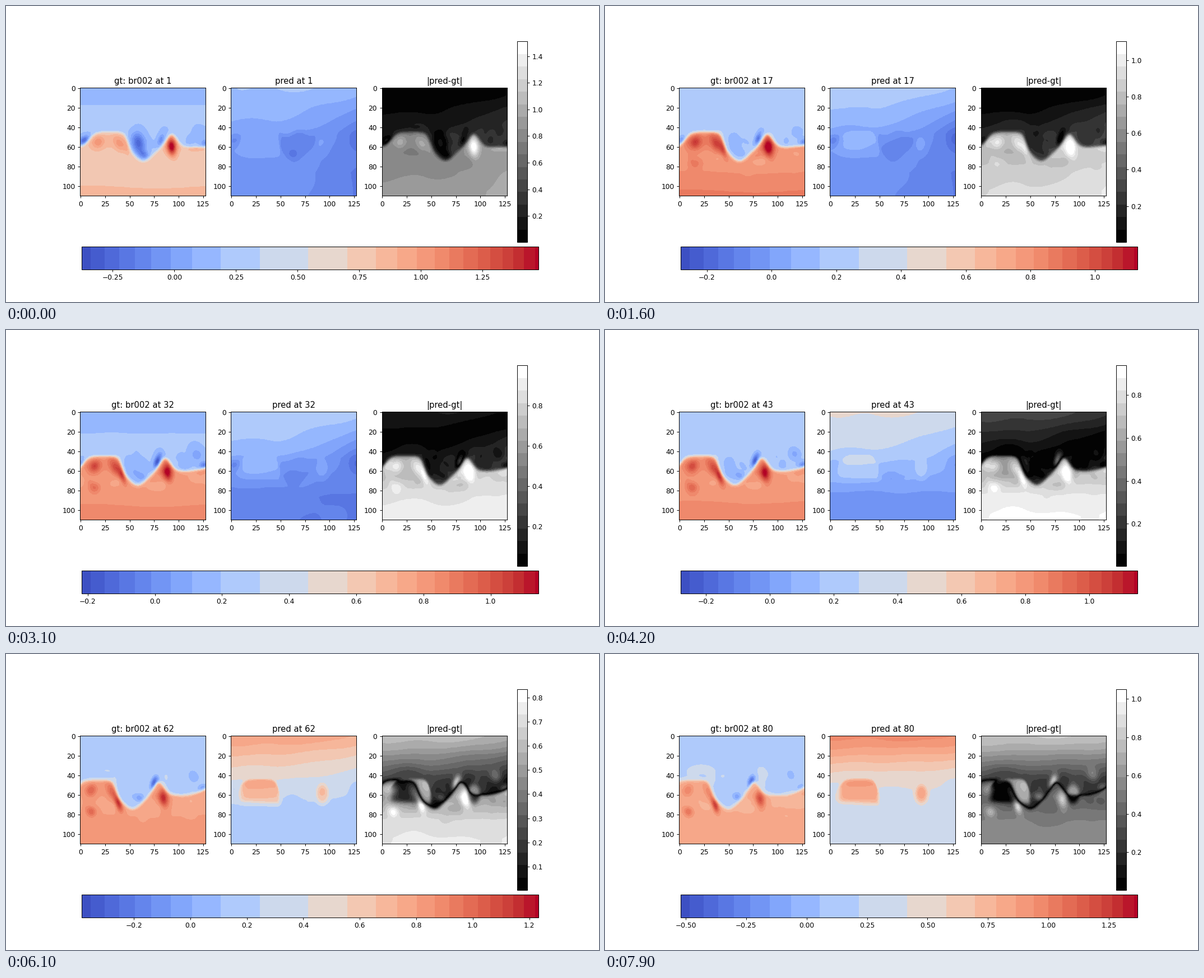
Animation of 1058x529 px, one loop 8 s. Source, as a matplotlib script:

```python
import numpy as np
import matplotlib.pyplot as plt
from matplotlib.animation import FuncAnimation
from matplotlib.colors import ListedColormap

W, H, FRAMES = 1058, 529, 80
NX, NY = 128, 110
xs, ys = np.arange(NX), np.arange(NY)
X, Y = np.meshgrid(xs.astype(float), ys.astype(float))

rng = np.random.default_rng(7)
EDDIES = [(rng.uniform(0, 138), rng.normal(58, 12), rng.uniform(2, 5), rng.uniform(2, 4.5),
           rng.uniform(-.8, .8), rng.uniform(-.06, .06)) for _ in range(45)]


def step(v):
    return .5 * (1 + np.tanh(v))


def ramp(t, middle, width):
    return step((t - middle) / width / 2)


def bell(v):
    return np.exp(-.5 * v ** 2)


def blob(x, y, sx, sy, tilt=0):
    c, s = np.cos(tilt), np.sin(tilt)
    u = (X - x) * c + (Y - y) * s
    v = (Y - y) * c - (X - x) * s
    return bell(np.hypot(u / sx, v / sy))


def wave(t):
    """Hump edge, trough and crest, all drifting left."""
    return 48.5 - .2 * t, 64 - .18 * t, 93 - .215 * t


def interface(t):
    edge, trough, crest = wave(t)
    hump = step((xs - 9 + .2 * t) / 6) - step((xs - edge) / 3.5)
    y = 60 - 15.5 * hump + 14 * bell((xs - trough) / 9) - 13 * bell((xs - crest) / 5.5)
    return y - .1 * t * np.clip((xs - 105) / 22, 0, 1) ** 2


def hot_spots(t):
    edge, trough, crest = wave(t)
    start = np.exp(-t / 8)
    return ((.29 + .0015 * t + .42 * start) * blob(crest + .08 * t, 60 + .06 * t, 3.7, 7, -.1)
            + (.12 + .005 * t) * blob(edge - 1 + .06 * t, 62 + .1 * t, 2.5, 6, -.3)
            + .18 * blob(edge - 9 + .08 * t, 57, 3.5, 6, -.4)
            + .2 * blob(18 - .12 * t, 55, 4, 5, .3)
            + .0027 * t * blob(17 - .1 * t, 77, 3.5, 4, -.4)
            + .2 * start * blob(118, 61.5, 6, 1.8)
            - .06 * blob(trough + 21, 76 - .06 * t, 7, 4))


def cold_spots(t):
    edge, trough, crest = wave(t)
    start = np.exp(-t / 6)
    return (-(.13 + .36 * start) * blob(trough - 5, 56, 5, 8, -.2)
            - (.004 * t + .25 * start) * blob(trough + 1 + .1 * t, 68 - .08 * t, 4, 3, .5)
            - (.27 + .004 * t) * blob(crest - 11 + .1 * t, 53 - .08 * t, 2.5, 5, .3)
            - (.2 + .25 * start) * blob(4 - .12 * t, 53, 4.5, 3, -.5)
            - .27 * blob(128 - .05 * t, 56 - .05 * t, 4, 3, -.4)
            - (.08 + .0015 * t) * blob(121 - .1 * t, 46 - .09 * t, 4, 5, -.3)
            + .05 * blob(38 - .2 * t, 36, 10, 5)
            + .05 * blob(crest + 7, 46 - .06 * t, 5, 7))


def truth(t):
    yi = interface(t)
    low = step((Y - yi) / np.hypot(1, np.gradient(yi)) / 1.7)
    upper = .18 + .015 * step((Y - 17) / 2) + .0003 * np.clip(Y - 17, 0, 30)
    lower = .77 + .088 * np.clip((Y + 1.5 * np.sin(X / 21 + 1) - 62) / 43, 0, 1) ** 1.2
    lower += (.11 - .001 * t) * bell((Y - 54) / 7) - .03 * np.exp(-t / 6)
    k = t / FRAMES
    noise = sum(a * blob(x - 11 * k, y, sx, sy, r + .5 * k) for x, y, sx, sy, r, a in EDDIES)
    field = (upper + cold_spots(t)) * (1 - low) + (lower + hot_spots(t)) * low
    return field + noise * min(1, .5 + t / 40)


# Shapes the prediction keeps from the first interface
Y0 = interface(0)
HUMP = (step((Y - Y0 + 1) / 1.5) * step((66 + .06 * X - Y) / 2.5)
        * step((X - 9) / 3) * step((49 - X) / 1.5))
BULB = np.exp(-np.hypot((X - 93) / 6.5, (Y - 59) / 10) ** 4)
BOWL = (step((Y0 + 1 - Y) / 2) * step((Y - 46 - 2 * np.sin(X / 4)) / 2)
        * step((X - 49) / 1.5) * step((86 - X) / 2.5))
SIDES = .12 * blob(3, 53, 5, 4, -.4) + .055 * blob(127, 53, 5, 6)
POCKET = blob(62, 66, 4.5, 4.5, -.5)
TOP = blob(70, 0, 28, 8)
SLOPE = np.clip((X - 45) / 82, 0, 1) ** 1.4
WOBBLE = .006 * (np.sin(X / 9 + Y / 13) + np.sin(X / 17 - Y / 8 + 2))


def forecast(t):
    # The top warms first, then the middle, then the floor
    top = .17 + .84 * ramp(t, 51, 11)
    mid = .02 + .46 * ramp(t, 42, 9)
    floor = -.05 + .37 * ramp(t, 62, 7)
    depth = np.clip(Y + 1.5 * np.sin(X / 23) + .02 * X, 0, None)
    field = top + (mid - top) * np.clip(depth / 45, 0, 1) ** 1.4
    field += (floor - mid) * np.clip((depth - 45) / 42, 0, 1)
    tail = .7 * max(0, 1 - t / 40)
    weight = np.interp(Y, [0, 20, 47, 80], [.4, .8, 1, tail])
    field -= .17 * (1 - (t / 85) ** 4) * SLOPE * weight
    field += (.05 + .38 * ramp(t, 52, 5)) * (HUMP + BULB) + .035 * TOP
    field -= .1 * np.exp(-t / 30) * BOWL + SIDES
    field -= (.03 + .07 * bell((t - 55) / 9)) * POCKET
    return field + WOBBLE


def limits(t):
    lo = np.interp(t, [0, 16, 29, 61, 79], [-.376, -.2816, -.207, -.385, -.521])
    hi = np.interp(t, [0, 16, 51, 79], [1.476, 1.131, 1.157, 1.368])
    err = np.interp(t, [0, 16, 31, 62, 79], [1.511, 1.103, .999, .828, 1.048])
    return (lo, hi), (lo, hi), (.002, err)


def banded(name, edges, tones):
    pos = (np.arange(256) + .5) / 256
    return ListedColormap(plt.get_cmap(name)(tones)[np.searchsorted(edges, pos)])


# Colour bands get narrower away from the neutral middle
reach = .1375 * np.append(.17, np.arange(1, 14)) ** .54
edges = np.sort(np.concatenate([.444 - reach, .444 + reach]))
edges = edges[(edges > 0) & (edges < 1)]
bounds = np.concatenate([[0], edges, [1]])
WARM = banded("coolwarm", edges, (bounds[1:] + bounds[:-1]) / 2)
GRAY = banded("gray", np.arange(1, 16) / 16, np.linspace(.012, .999, 16))

fig = plt.figure(figsize=(12, 6), dpi=88.167, facecolor="white")


def axes(x, top, w, h):
    return fig.add_axes([x / W, 1 - (top + h) / H, w / W, h / H])


panels, images = [], []
for i, cmap in enumerate([WARM, WARM, GRAY]):
    ax = axes(132.3 + i * 269.14, 146.4, 223.9, 192.7)
    images.append(ax.imshow(np.zeros((NY, NX)), cmap=cmap, vmin=0, vmax=1, aspect="auto"))
    panels.append(ax)
panels[2].set_title("|pred-gt|")
fig.colorbar(images[0], cax=axes(134.9, 430.1, 815, 40.7), orientation="horizontal")
fig.colorbar(images[2], cax=axes(911.8, 63.5, 17.9, 358.6))


def draw(t):
    gt, pred = truth(t), forecast(t)
    for im, data, lim in zip(images, (gt, pred, np.abs(pred - gt)), limits(t)):
        im.set_data(np.clip(data, *lim))
        im.set_clim(*lim)
    panels[0].set_title(f"gt: br002 at {t + 1}")
    panels[1].set_title(f"pred at {t + 1}")
    return images


anim = FuncAnimation(fig, draw, frames=FRAMES, interval=100, repeat=True, repeat_delay=0)
plt.show()
```
